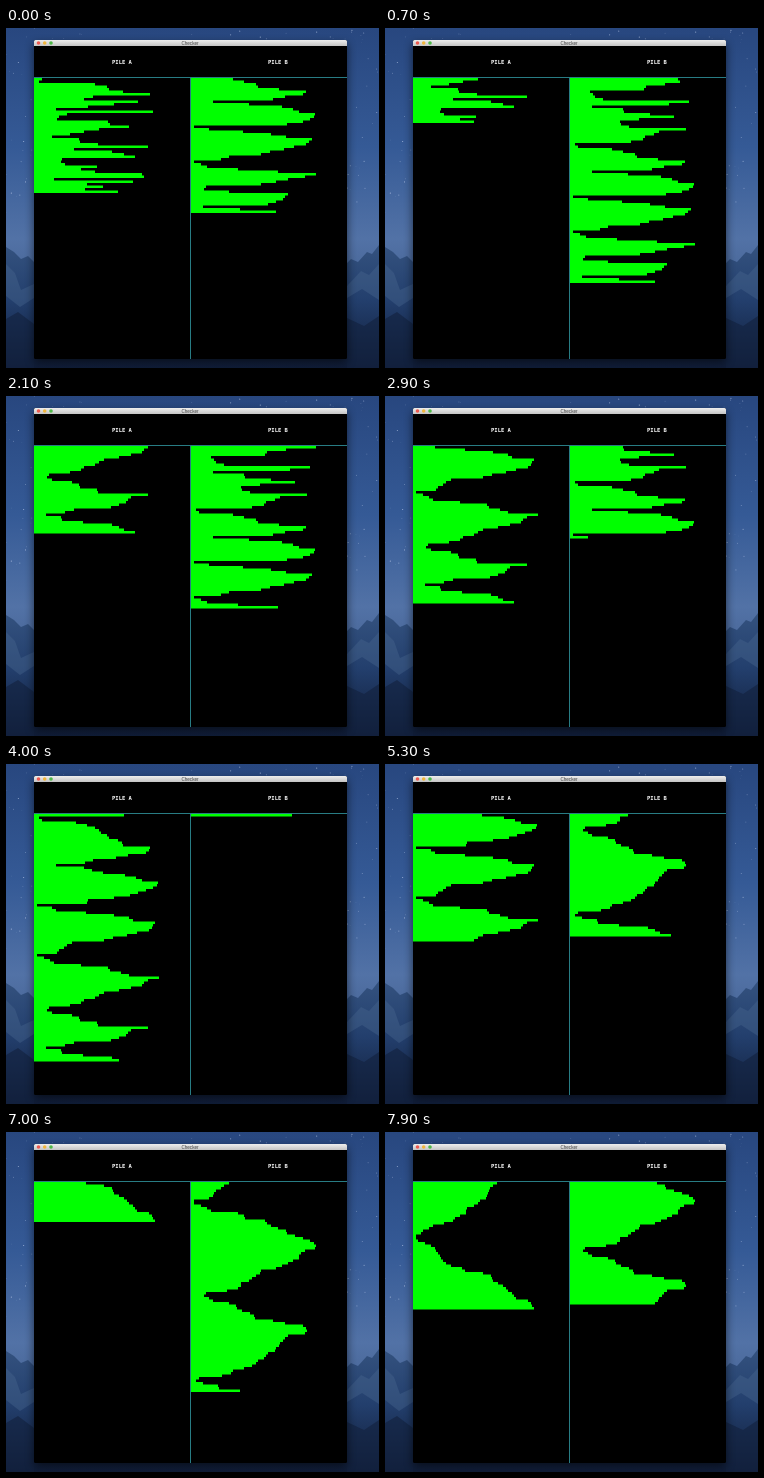
These frames come from a looping animation (373 px wide and 340 px high, 8 s). An HTML page:

```html
<!DOCTYPE html>
<html lang="en">
<head>
<meta charset="utf-8">
<title>Checker</title>
<style>
  html, body { margin: 0; width: 100%; height: 100%; overflow: hidden; background: #1a2c50; }
  svg { display: block; width: 373px; height: 340px; }
  .title { font: 4.6px "Liberation Sans", Arial, sans-serif; fill: #444; text-anchor: middle; }
  .label { font: bold 5.5px "DejaVu Sans Mono", monospace; fill: #fff; text-anchor: middle; }
  .bars { fill: #0f0; }
  .grid { stroke: #287c84; fill: none; }
</style>
</head>
<body>
<svg viewBox="0 0 373 340">
  <defs>
    <linearGradient id="sky" x2="0" y2="1">
      <stop offset="0" stop-color="#28477f"/>
      <stop offset=".35" stop-color="#355a96"/>
      <stop offset=".62" stop-color="#5272a6"/>
      <stop offset=".72" stop-color="#4a689a"/>
    </linearGradient>
    <linearGradient id="rock" x2="0" y2="1">
      <stop offset="0" stop-color="#34527f"/>
      <stop offset=".45" stop-color="#233f6d"/>
      <stop offset="1" stop-color="#101d38"/>
    </linearGradient>
    <linearGradient id="bar" x2="0" y2="1">
      <stop offset="0" stop-color="#eee"/>
      <stop offset="1" stop-color="#c4c4c4"/>
    </linearGradient>
    <filter id="blur" x="-10%" y="-10%" width="120%" height="120%">
      <feGaussianBlur stdDeviation="5"/>
    </filter>
  </defs>

  <rect width="373" height="340" fill="url(#sky)"/>
  <g id="stars" fill="#dce8ff"></g>
  <path d="M0 219L8 224 15 231 22 228 30 236 190 250 338 238 345 231 352 234 361 224 366 226 373 217V340H0Z" fill="url(#rock)"/>
  <path d="M0 236L9 245 15 262 28 256V270L14 279 0 268ZM373 236L363 247 355 243 341 258V270L356 261 373 272Z" fill="#496890" opacity=".4"/>
  <path d="M0 291L12 284 28 296V340H0ZM373 288L358 298 341 290V340H373Z" fill="#13233f" opacity=".65"/>
  <rect x="28" y="16" width="313" height="318" fill="#000" opacity=".6" filter="url(#blur)"/>

  <rect x="28" y="12" width="313" height="319" rx="1.5" fill="#000"/>
  <path d="M28 18V13.5Q28 12 29.5 12H339.5Q341 12 341 13.5V18Z" fill="url(#bar)"/>
  <circle cx="32.5" cy="15" r="1.8" fill="#ee5a50"/>
  <circle cx="38.7" cy="15" r="1.8" fill="#f0b53c"/>
  <circle cx="45" cy="15" r="1.8" fill="#4fb848"/>
  <text class="title" x="184" y="16.8">Checker</text>
  <text class="label" x="116" y="36.4">PILE A</text>
  <text class="label" x="272" y="36.4">PILE B</text>
  <path class="grid" d="M28 49.5H341M184.5 50V331"/>
  <path class="bars" id="pileA"/>
  <path class="bars" id="pileB"/>
</svg>
<script>
const LOOP = 8000, STEP = 100, ROW = 2.5, TOP = 50;

// Bar lengths of both piles at the start, top first
const startA = [
  8, 5, 61, 73, 75, 89, 116, 59, 50, 104, 80, 54, 22, 119, 33, 25, 23, 74, 76, 95, 65, 50, 36,
  18, 45, 46, 64, 114, 40, 78, 90, 101, 28, 27, 31, 63, 47, 61, 108, 110, 20, 99, 53, 69, 51, 84
];
const startB = [
  42, 53, 65, 67, 88, 115, 112, 94, 82, 22, 58, 91, 102, 108, 124, 123, 119, 112, 96, 3, 18, 52,
  80, 95, 121, 118, 115, 103, 93, 79, 70, 38, 30, 3, 10, 16, 47, 87, 125, 114, 97, 85, 70, 15, 13,
  38, 97, 94, 92, 85, 77, 12, 49, 85
];

// [time, pushes done]; a half means the next bar has already been rotated up
const pace = [[0, 0], [1400, 54], [2900, 109], [4000, 147.5], [5300, 195], [6200, 230], [7900, 297]];

// Merge sort between two piles: take from either end of the giving pile,
// extend the current run, and turn the direction when neither end fits.
function runSort(a, b, total) {
  const history = [];
  let from = a, to = b, dir = -1, last = b[0], pushes = 0;
  const save = n => history.push({ n, a: [...a], b: [...b] });
  const fits = v => v * dir >= last * dir;

  save(0);
  while (pushes < total) {
    if (!from.length) {
      [from, to] = [to, from];
      dir = -1;
      last = Infinity;
    }
    const head = from[0], tail = from[from.length - 1];
    if (!fits(head) && !fits(tail)) dir = -dir;
    const useTail = fits(tail) && (!fits(head) || tail * dir < head * dir);
    if (useTail) {
      from.unshift(from.pop());
      save(pushes + 0.5);
    }
    last = from.shift();
    to.unshift(last);
    save(++pushes);
  }
  return history;
}

const history = runSort(startA, startB, 305);
const marks = pace.map(([t, n]) => [t, history.findIndex(s => s.n >= n)]);

function stateAt(t) {
  let i = 0;
  while (i < marks.length - 2 && t >= marks[i + 1][0]) i++;
  const [t0, s0] = marks[i], [t1, s1] = marks[i + 1];
  return history[Math.round(s0 + (s1 - s0) * (t - t0) / (t1 - t0))];
}

function outline(pile, x) {
  if (!pile.length) return "";
  return `M${x} ${TOP}` + pile.map(w => `H${x + w}v${ROW}`).join("") + `H${x}Z`;
}

function addStars() {
  let seed = 7;
  const rnd = () => (seed = seed * 16807 % 2147483647) / 2147483647;
  let dots = "";
  for (let i = 0; i < 260; i++) {
    const x = rnd() * 373, y = rnd() * 200, r = 0.25 + rnd() * 0.4;
    dots += `<circle cx="${x}" cy="${y}" r="${r}" opacity="${0.2 + rnd() * 0.5}"/>`;
  }
  document.getElementById("stars").innerHTML = dots;
}

const pathA = document.getElementById("pileA");
const pathB = document.getElementById("pileB");
const begin = performance.now();
let shown = -1;

function draw() {
  const t = Math.floor((performance.now() - begin) % LOOP / STEP) * STEP;
  if (t !== shown) {
    shown = t;
    const { a, b } = stateAt(t);
    pathA.setAttribute("d", outline(a, 28));
    pathB.setAttribute("d", outline(b, 185));
  }
  requestAnimationFrame(draw);
}

addStars();
draw();
</script>
</body>
</html>
```
